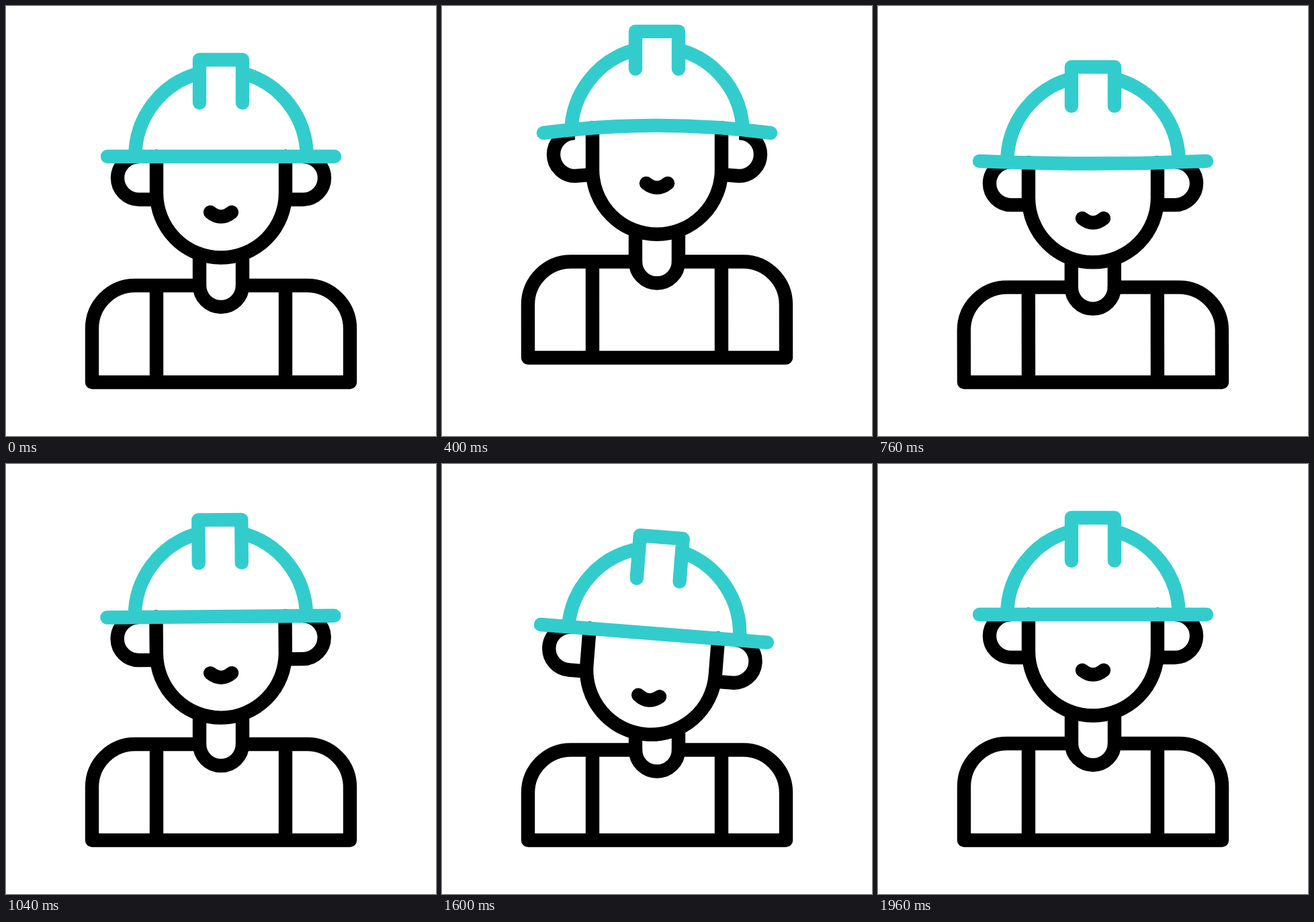
An HTML page that plays this animation: 640x640 px, repeating every 2000 ms.

```html
<!DOCTYPE html>
<html lang="en">
<head>
<meta charset="utf-8">
<title>Builder</title>
<style>
  html, body { margin: 0; width: 100%; height: 100%; overflow: hidden; background: #fff; }
  svg { display: block; width: 100%; height: 100%; }
  path { fill: none; stroke: #000; stroke-width: 20.4; stroke-linecap: round; stroke-linejoin: round; }
  #ears, #neck { stroke-linecap: butt; }
  #face { fill: #fff; }
  #hat path { stroke: #33cccc; }
  #dome { stroke-linecap: butt; }
</style>
</head>
<body>
<svg viewBox="0 0 640 640">
  <path id="body"/>
  <path id="neck"/>
  <g id="head">
    <path id="ears"/>
    <path id="face"/>
    <path id="mouth"/>
    <g id="hat">
      <path id="dome"/>
      <path id="ridge"/>
      <path id="brim"/>
    </g>
  </g>
</svg>
<script>
const LOOP = 2000, STEP = 40;
const el = id => document.getElementById(id);
const path = (id, d) => el(id).setAttribute('d', d);

// Vertical offsets of each part, plus head angle, sideways shifts and ear slope.
const rest = { base: 0, chest: 0, face: 0, ear: 0, mouth: 0, tip: 0, mid: 0,
               top: 0, leg: 0, dome: 0, angle: 0, dx: 0, lean: 0, slope: 0 };
const leap = { ...rest, base: -40.5, chest: -40.4, face: -41.3, ear: -42, mouth: -51.4, tip: -41.6,
               mid: -55.3, top: -51, leg: -58, dome: -42, slope: -2.4 };
const land = { ...rest, chest: 9.5, face: 25.3, ear: 29.7, mouth: 33, tip: 25, mid: 38.5,
               top: 39, leg: 18, dome: 30, lean: -0.6 };
const nod = (y, angle, dx) => ({ ...rest, chest: 9.5, face: y, ear: y, mouth: y + 10, tip: y,
               mid: y, top: y, leg: y, dome: y, angle, dx });
const left = nod(28, -4.08, -5.2), right = nod(28.3, 4.5, -4.6);

const keys = [
  [0, rest], [100, rest], [367, leap], [600, land], [833, rest], [998, rest],
  [1267, left], [1400, left], [1600, right], [1727, right], [1933, rest], [LOOP, rest]
];

// Halfway between linear and smoothstep.
const ease = u => (u + u * u * (3 - 2 * u)) / 2;

function poseAt(t) {
  const i = keys.findIndex(k => k[0] > t);
  const [t0, a] = keys[i - 1], [t1, b] = keys[i];
  const u = ease((t - t0) / (t1 - t0)), p = {};
  for (const k in a) p[k] = a[k] + (b[k] - a[k]) * u;
  return p;
}

function draw(t) {
  const p = poseAt(t);
  const X = x => x + p.lean;
  const chest = 416 + p.chest, floor = 560 + p.base;
  path('body', `M${X(288)} ${chest}H${X(192)}a64 64 0 0 0-64 64L128 ${floor}H512L${X(512)} ${chest + 64}a64 64 0 0 0-64-64H${X(352)}` +
    `M${X(224)} ${chest}L224 ${floor}M${X(416)} ${chest}L416 ${floor}`);
  path('neck', `M${X(288)} ${364 + p.face}V${chest}a32 32 0 0 0 64 0V${364 + p.face}`);

  el('head').setAttribute('transform', `translate(${p.dx} 0) rotate(${p.angle} 320 ${224 + p.tip})`);
  const ear = 288 + p.ear;
  path('ears', `M224 ${ear + p.slope}L198 ${ear}a32 32 0 0 1 0-64` +
    `M416 ${ear + p.slope}L442 ${ear}a32 32 0 0 0 0-64`);

  // The sides of the face end under the bent brim.
  const tip = 224 + p.tip, bend = p.mid - p.tip, side = tip + 0.677 * bend - 0.3;
  const jaw = 278.5 + p.face;
  path('face', `M224 ${side}V${jaw}a96 96 0 0 0 192 0V${side}`);
  path('mouth', `M304 ${307 + p.mouth}q16 13 32 0`);

  const dome = 224 + p.dome, join = dome - 124;
  path('dome', `M192.3 ${dome}A128 128 0 0 1 288 ${join}M447.7 ${dome}A128 128 0 0 0 352 ${join}`);
  path('ridge', `M288 ${144 + p.leg}V${80 + p.top}H352V${144 + p.leg}`);
  path('brim', `M151 ${tip}Q320 ${tip + 2 * bend} 489 ${tip}`);
}

const start = performance.now();
function tick() {
  const t = (performance.now() - start) % LOOP;
  draw(Math.floor(t / STEP) * STEP);
  requestAnimationFrame(tick);
}
tick();
</script>
</body>
</html>
```
